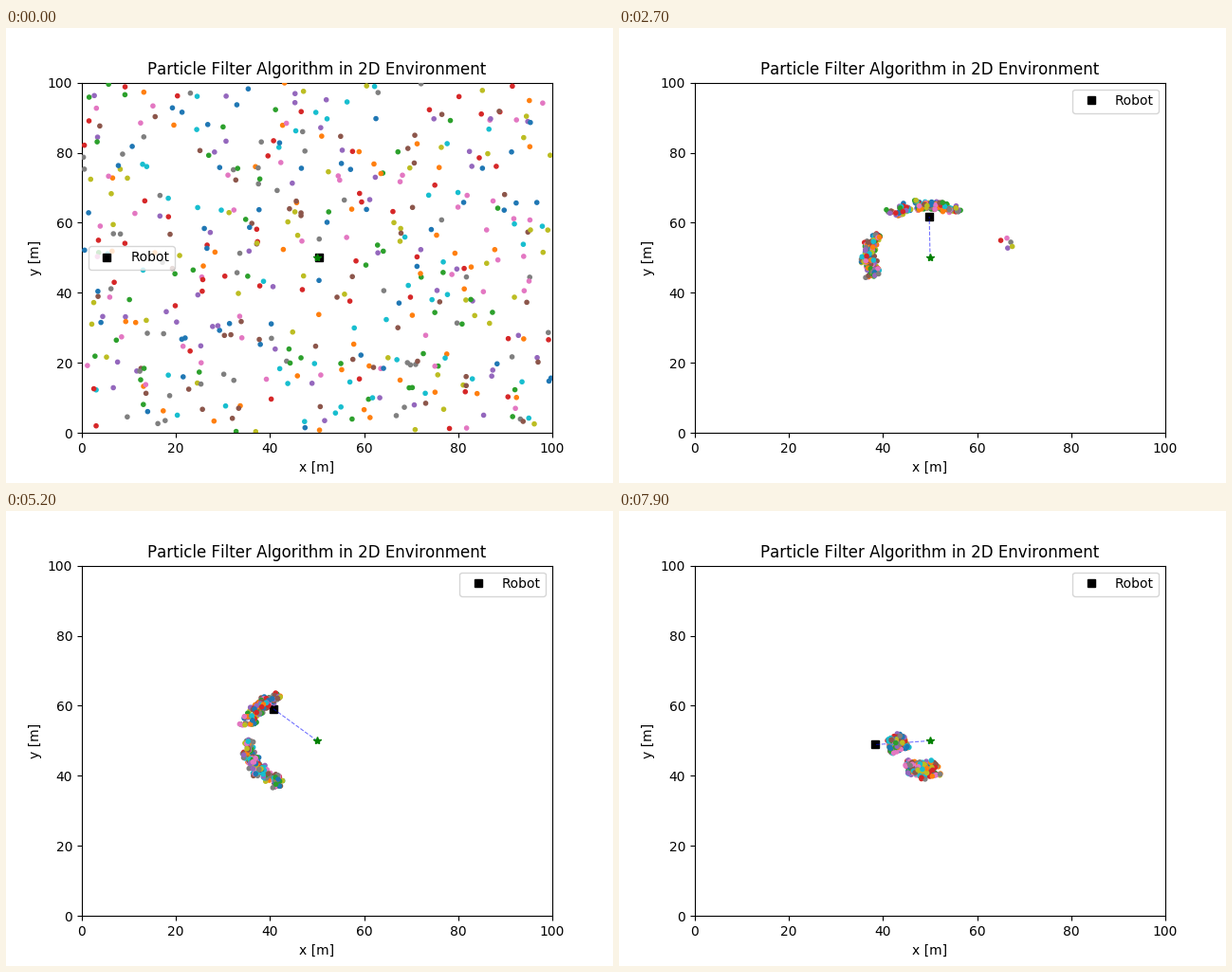
Write a matplotlib script that moves like this. It is 640x480 px and loops after 8000 ms.

```python
import numpy as np
import matplotlib.pyplot as plt
from matplotlib.animation import FuncAnimation

FRAMES, INTERVAL, COUNT = 80, 100, 480
HOME = np.array([50.0, 50.0])

plt.rcParams["text.kerning_factor"] = 6

# Robot: a few points on its left-hand turn
ROBOT_KEYS = np.array([0, 8, 20, 34, 46, 59, 72, 79])
ROBOT = np.array([(50.4, 50.1), (53.9, 53.3), (52.6, 59.5), (46.6, 62.8),
                  (42.4, 60.9), (39.0, 56.7), (36.8, 51.8), (38.4, 48.9)])
ROBOT_SLOPES = np.gradient(ROBOT, ROBOT_KEYS, axis=0)

# Two arms of particles around the landmark: direction, half sweep, radius
ARM_KEYS = [8, 20, 34, 46, 59, 79]
LEFT = ([185, 168, 188, 196, 226, 257], [70, 24, 38, 36, 30, 26],
        [6.5, 10.2, 16, 17.3, 12, 8.5])
UPPER = ([88, 86, 105, 136, 153, 187], [35, 26, 42, 30, 17, 20],
         [7.5, 12.9, 17, 18, 12.6, 7])

rng = np.random.default_rng(7)
START = rng.uniform(0, 100, (COUNT, 2))
CLUMPS = rng.triangular(-1, 0, 1, (30, 2))
CLUMP = rng.integers(0, len(CLUMPS), COUNT)
SWEEP, DEPTH = CLUMPS[CLUMP].T
SPREAD = rng.normal(0, 0.35, (COUNT, 2))
IS_UPPER = np.arange(COUNT) % 5 < 2


def robot_at(frame):
    """Cubic Hermite curve through the robot's points."""
    k = min(np.searchsorted(ROBOT_KEYS, frame, side="right") - 1, len(ROBOT) - 2)
    span = ROBOT_KEYS[k + 1] - ROBOT_KEYS[k]
    u = (frame - ROBOT_KEYS[k]) / span
    ease = u * u * (3 - 2 * u)
    return (ROBOT[k] + ease * (ROBOT[k + 1] - ROBOT[k])
            + span * u * (1 - u) * ((1 - u) * ROBOT_SLOPES[k] - u * ROBOT_SLOPES[k + 1]))


def arm_at(arm, frame):
    return [np.interp(frame, ARM_KEYS, row) for row in arm]


def particles(frame):
    if frame == 0:
        return START
    noise = np.random.default_rng(frame)
    pose = np.where(IS_UPPER, np.c_[arm_at(UPPER, frame)], np.c_[arm_at(LEFT, frame)])

    # Strays on the right thin out as they move away
    age = frame - 8
    strays = int(40 * np.exp(-age / 10))
    pose[:, :strays] = np.c_[[14 - 32 * np.exp(-age / 6),
                              2 + 55 * np.exp(-age / 9),
                              9.2 + 0.42 * age]]

    direction, half, radius = pose
    band = 1.3 + 1.5 * (frame / FRAMES) ** 3
    angle = np.radians(direction + half * SWEEP)
    reach = radius * (0.6 + 0.4 * min(frame / 8, 1)) + band * DEPTH
    ring = np.column_stack([np.cos(angle), np.sin(angle)]) * reach[:, None]
    return noise.permutation(HOME + ring + SPREAD + noise.normal(0, 0.1, ring.shape))


fig, ax = plt.subplots(figsize=(6.4, 4.8), dpi=100)
ax.set(xlim=(0, 100), ylim=(0, 100), xlabel="x [m]", ylabel="y [m]",
       title="Particle Filter Algorithm in 2D Environment")
robot, = ax.plot([], [], "ks", label="Robot", zorder=2)
link, = ax.plot([], [], "b--", lw=0.8, alpha=0.55, zorder=2.1)
ax.plot(*HOME, "g*", zorder=2.2)
dots = ax.scatter(*START.T, s=36, marker=".", linewidths=1, zorder=3,
                  c=[f"C{i % 10}" for i in range(COUNT)])
legend = ax.legend(handles=[robot], loc="center left")


def update(frame):
    x, y = robot_at(frame)
    robot.set_data([x], [y])
    link.set_data([HOME[0], x], [HOME[1], y])
    dots.set_offsets(particles(frame))
    legend.set_loc("center left" if frame == 0 else "upper right")
    return robot, link, dots, legend


anim = FuncAnimation(fig, update, frames=FRAMES, interval=INTERVAL,
                     repeat=True, repeat_delay=0, blit=False)
plt.show()
```
